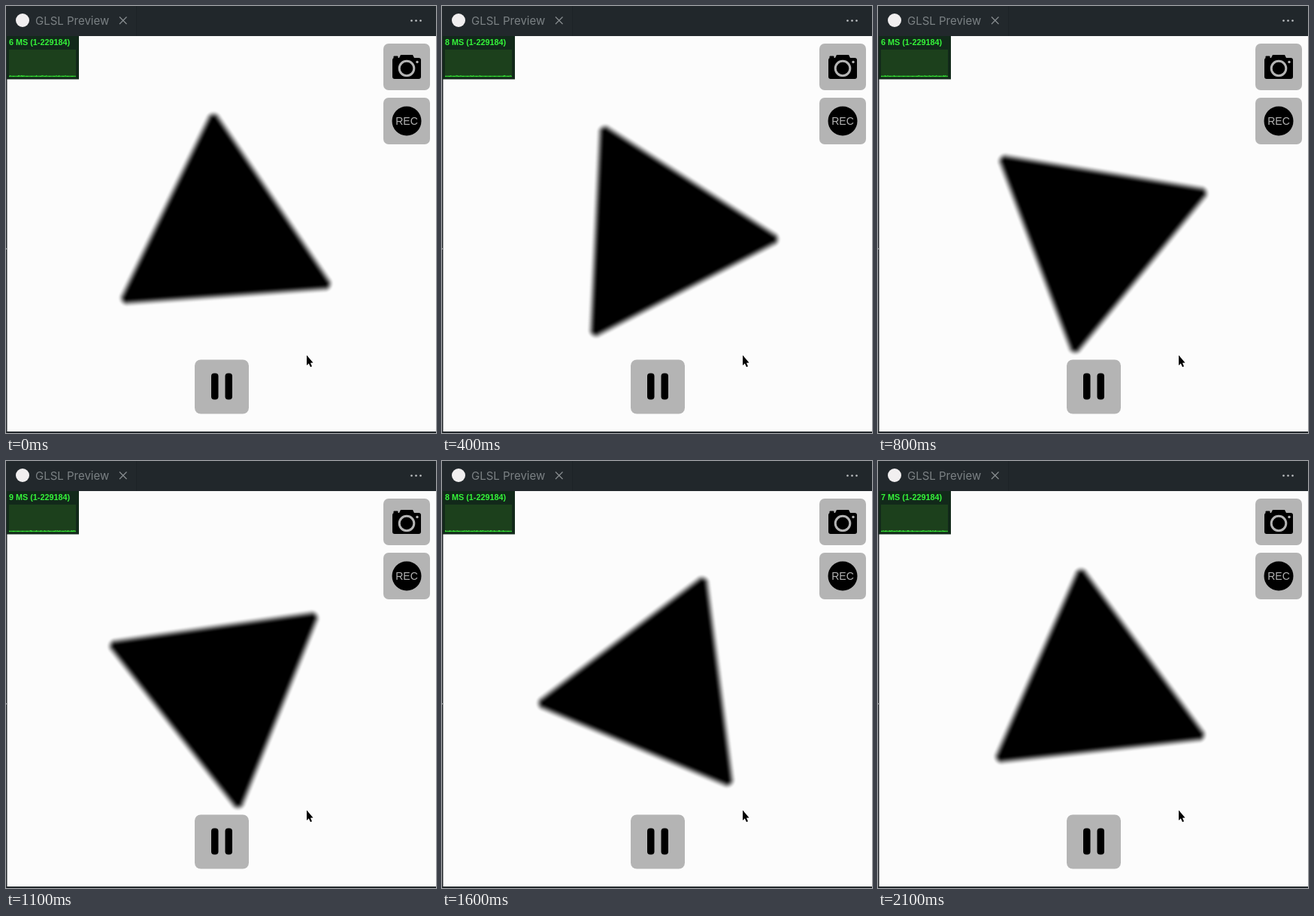
Write an HTML page with a canvas that moves like this. It is 572 px wide and 568 px high and loops after 2.2 s.

```html
<!DOCTYPE html>
<html lang="en">
<head>
<meta charset="utf-8">
<title>GLSL Preview</title>
<style>
html, body { margin: 0; width: 100%; height: 100%; overflow: hidden; background: #fcfcfc; }
canvas { display: block; width: 572px; height: 568px; }
</style>
</head>
<body>
<canvas id="stage" width="572" height="568"></canvas>
<script>
const ctx = document.getElementById('stage').getContext('2d');
const LOOP = 2200, STEP = 100;
const PAPER = 252, GRAY = '#b4b4b4';
const CX = 287, CY = 303;          // centre of the shader view
const HALF = 131.5, SOFT = 13.2;   // half side and edge softness
const REACH = 168;
const START = 25.9, SPEED = -58.2; // degrees, degrees per second
const MILLIS = '6778878768896788898977';
const K = Math.sqrt(3);
const shade = ctx.createImageData(REACH * 2, REACH * 2);

function rect(x, y, w, h, color) {
  ctx.fillStyle = color;
  ctx.fillRect(x, y, w, h);
}

function round(x, y, w, h, r, color) {
  ctx.fillStyle = color;
  ctx.beginPath();
  ctx.roundRect(x, y, w, h, r);
  ctx.fill();
}

function disc(x, y, r, color) {
  ctx.fillStyle = color;
  ctx.beginPath();
  ctx.arc(x, y, r, 0, Math.PI * 2);
  ctx.fill();
}

function path(points, color) {
  ctx.fillStyle = color;
  ctx.beginPath();
  points.forEach(([x, y]) => ctx.lineTo(x, y));
  ctx.closePath();
  ctx.fill();
}

function label(text, x, y, font, color, align = 'left') {
  ctx.font = font;
  ctx.fillStyle = color;
  ctx.textAlign = align;
  ctx.fillText(text, x, y);
}

// Signed distance to an equilateral triangle pointing along +y
function triangle(x, y) {
  x = Math.abs(x) - HALF;
  y += HALF / K;
  if (x + K * y > 0) [x, y] = [(x - K * y) / 2, (-K * x - y) / 2];
  x -= Math.min(0, Math.max(-2 * HALF, x));
  return -Math.hypot(x, y) * Math.sign(y);
}

function drawTriangle(sec) {
  const a = (START + SPEED * sec) * Math.PI / 180;
  const c = Math.cos(a), s = Math.sin(a), size = REACH * 2;
  for (let j = 0, i = 0; j < size; j++) {
    for (let k = 0; k < size; k++, i += 4) {
      const dx = k + 0.5 - REACH, dy = j + 0.5 - REACH;
      const d = triangle(dy * c - dx * s, dx * c + dy * s);
      const u = Math.min(1, Math.max(0, d / SOFT));
      const v = PAPER * u * u * (3 - 2 * u);
      shade.data[i] = shade.data[i + 1] = shade.data[i + 2] = v;
      shade.data[i + 3] = 255;
    }
  }
  ctx.putImageData(shade, CX - REACH, CY - REACH);
}

function drawHeader() {
  rect(0, 0, 572, 40, '#21272b');
  rect(0, 0, 173, 40, '#22282c');
  rect(173, 0, 1, 40, '#1d2327');
  disc(22, 19, 9, '#f1eff0');
  label('GLSL Preview', 39, 25, '15px Inter, sans-serif', '#7b8184');
  ctx.strokeStyle = '#8a8f92';
  ctx.lineWidth = 1.2;
  ctx.beginPath();
  ctx.moveTo(151, 14.5); ctx.lineTo(160.5, 24);
  ctx.moveTo(160.5, 14.5); ctx.lineTo(151, 24);
  ctx.stroke();
  for (const x of [539.5, 545.5, 551.5]) disc(x, 19.5, 1.3, '#c3c6c8');
}

function drawStats(n) {
  rect(1, 40, 96, 57.5, '#12291a');
  rect(4, 58, 89, 36.5, '#1c401c');
  label(MILLIS[n] + ' MS (1-229184)', 4, 52,
    'bold 10.8px "Liberation Sans", Arial, sans-serif', '#35f53a');
  for (let i = 0; i < 74; i++) {
    const h = Math.sin((i + n * 6) * 12.9898) * 43758.5453;
    const tall = h - Math.floor(h) > 0.8 ? 0.6 : 0;
    rect(4 + i * 1.2, 92.8 - tall, 1.2, 1.4 + tall, '#35e636');
  }
}

function drawButtons() {
  round(502, 50, 62, 62, 7, GRAY);
  round(515.5, 66.5, 6, 4, 1, '#000');
  path([[522, 71], [525, 65], [541, 65], [544, 71]], '#000');
  round(514, 69, 38, 28, 3, '#000');
  ctx.strokeStyle = GRAY;
  ctx.lineWidth = 3;
  ctx.beginPath();
  ctx.arc(533, 83, 9.8, 0, Math.PI * 2);
  ctx.stroke();
  disc(547, 74.5, 1.7, GRAY);

  round(502, 122, 62, 62, 7, GRAY);
  disc(533, 153, 19.5, '#000');
  label('REC', 533, 158, '14px "Liberation Sans", Arial, sans-serif', GRAY, 'center');

  round(251, 470.5, 72, 72, 8, GRAY);
  round(273, 488.5, 9.5, 35, 4, '#000');
  round(291.5, 488.5, 9.5, 35, 4, '#000');
}

function drawCursor() {
  const arrow = [[400, 464.5], [400, 478], [402.8, 475.4], [405, 480.2],
    [407, 479.3], [405, 474.7], [408.5, 474.5]];
  ctx.strokeStyle = '#fff';
  ctx.lineWidth = 2;
  path(arrow, '#000');
  ctx.stroke();
  path(arrow, '#000');
}

function draw(n) {
  rect(0, 0, 572, 568, `rgb(${PAPER},${PAPER},${PAPER})`);
  drawTriangle(n * STEP / 1000);
  drawHeader();
  rect(0, 40, 1.5, 528, '#24292d');
  rect(0, 566, 572, 2, '#24292d');
  rect(0, 322, 1, 2, '#8b8f92');
  drawStats(n);
  drawButtons();
  drawCursor();
}

const begin = performance.now();
let shown = -1;
function tick() {
  const n = Math.floor((performance.now() - begin) % LOOP / STEP);
  if (n !== shown) draw(shown = n);
  requestAnimationFrame(tick);
}
tick();
</script>
</body>
</html>
```
